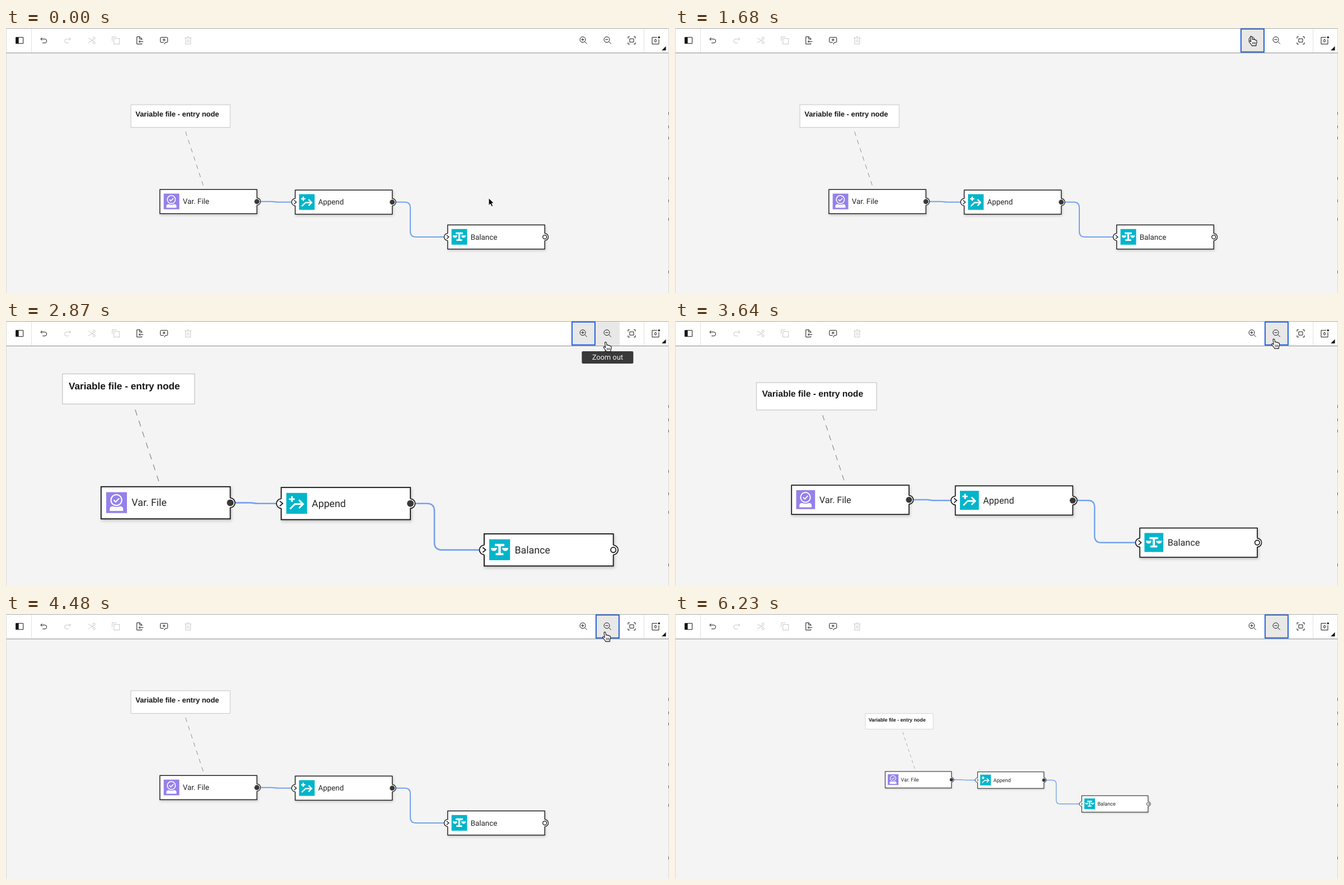
These frames come from a looping animation (1184 by 473 pixels, 6.86 s). An HTML page:

```html
<!DOCTYPE html>
<html lang="en">
<head>
<meta charset="utf-8">
<title>Flow canvas zoom</title>
<style>
html, body { margin: 0; width: 100%; height: 100%; overflow: hidden; background: #f4f4f4; }
svg { display: block; width: 1184px; height: 473px; }
text { font: 13.35px Roboto, sans-serif; fill: #262626; text-rendering: geometricPrecision; }
.note { font: bold 12.92px "Liberation Sans", Arial, sans-serif; fill: #161616; }
#tip text { font-size: 12.85px; fill: #f4f4f4; text-anchor: middle; }
.box { fill: #fff; stroke: #161616; stroke-width: 1.4; filter: drop-shadow(1px 2px 2px rgba(0,0,0,.2)); }
.line { fill: none; stroke: #161616; stroke-width: 1.3; }
.link { fill: none; stroke: #74a3ee; stroke-width: 2; }
.glyph { fill: none; stroke: #fff; stroke-width: 2.3; }
.thin { stroke-width: 1.6; }
.ico { fill: none; stroke: #161616; stroke-width: 2; }
.off { opacity: .24; }
.solid { fill: #161616; stroke: none; }
</style>
</head>
<body>
<svg viewBox="0 0 1184 473">
  <rect width="1184" height="473" fill="#f4f4f4"/>
  <g id="scene"></g>
  <rect width="1184" height="44" fill="#fff"/>
  <rect y="44" width="1184" height="1" fill="#8d8d8d"/>
  <rect id="hover" y=".7" width="43" height="43" fill="#e8e8e8"/>
  <rect id="focus" y="1.7" width="41" height="41" fill="#e8e8e8" stroke="#2160db" stroke-width="2"/>
  <path d="M45.5 1V44M1139.5 1V44" stroke="#e0e0e0"/>
  <g id="bar"></g>
  <path d="M1178.5 32.500v7.500h-7.500z" fill="#161616"/>
  <path d="M0 .5H1184" stroke="#a8a8a8"/>
  <path d="M.5 0V473M1183.500 0V473" stroke="#d8d8d8"/>
  <path id="edge" stroke="#555"/>
  <g id="tip">
    <path d="M-5.5 54L0 47.5L5.5 54z" fill="#393939"/>
    <rect y="54" height="22" rx="2" fill="#393939"/>
    <text y="69.3"></text>
  </g>
  <path id="arrow" d="M0 0V13.2L3 10.4L5.2 15.2L7.6 14.1L5.5 9.4H9.4Z" fill="#000" stroke="#fff" stroke-linejoin="round"/>
  <g id="hand" stroke="#111" stroke-width="1.1" stroke-linejoin="round" stroke-linecap="round">
    <path fill="#fff" d="M-1.5 2C-1.7 .2 1 .2 1.3 2L2.2 6.6C2.8 5.3 4.8 5.5 5 7.1C5.8 6 7.4 6.4 7.5 7.9C8.6 7.2 9.9 7.9 10 9.3C10.3 12 9.4 13.3 8.8 15V17.6H1.2C.6 15.5 -1.6 14 -3.4 11.2C-4.8 9.2 -3 8.2 -1.7 9.4L-.4 10.6Z"/>
    <path fill="none" d="M2.6 11.3V14.6M4.8 11.3V14.6M7 11.3V14.6" stroke-width=".9"/>
  </g>
</svg>
<script>
const $ = id => document.getElementById(id);
const LOOP = 6860, STEP = 70, CX = 592, CY = 265.6;
const NODE_W = 173.3, NODE_H = 43.1, PORT_R = 6.4, CELL = 43;

// Flow: comment, links and nodes
const glyphs = {
  file: `<circle class="glyph thin" cx="13.7" cy="10.6" r="7.2"/>
    <path class="glyph thin" d="M10.2 10.6l2.6 2.5 4.6-4.8"/>
    <path fill="#fff" d="M4.8 25.2v-2.6q0-3.6 4-3.6q5 1.8 10 0q4 0 4 3.6v2.6z"/>`,
  append: '<path class="glyph" d="M7.5 4.500v7.500M3.700 8.300h7.600M5 21.500l6.500-6.500H22M17 9.500l5.500 5.500-5.500 5.500"/>',
  scale: `<path fill="#fff" d="M7.500 6h12.700v3.200h-4.700v9.300h3.500v2.800H8.700v-2.800h3.500V9.200H7.500z
    M2 11.500h8.400a4.200 4.200 0 0 1-8.400 0zM17.300 11.500h8.400a4.200 4.200 0 0 1-8.400 0z"/>`
};

const port = (x, y, sweep) => `<circle cx="${x}" cy="${y}" r="${PORT_R}" fill="#fff"/>
  <path class="line" d="M${x} ${y - PORT_R}a${PORT_R} ${PORT_R} 0 0 ${sweep} 0 ${2 * PORT_R}"/>`;

function node(x, y, name, color, glyph, input, open) {
  const py = y + NODE_H / 2, rx = x + NODE_W;
  const dot = open ? 'class="line" r="3.500"' : 'fill="#393939" r="4.500"';
  return `<rect class="box" x="${x}" y="${y}" width="${NODE_W}" height="${NODE_H}"/>
    <g transform="translate(${x + 6.8} ${y + 7.3})">
      <rect width="27.9" height="28" fill="${color}"/>${glyphs[glyph]}</g>
    <text x="${x + 41}" y="${y + 26}">${name}</text>
    ${input ? port(x, py, 0) + `<path class="line" d="M${x - 2} ${py - 3.3}l4 3.3-4 3.3"/>` : ''}
    ${port(rx, py, 1)}<circle cx="${rx}" cy="${py}" ${dot}/>`;
}

$('scene').innerHTML = `
  <path d="M320.6 185L352.2 281" stroke="#8d8d8d" stroke-dasharray="8 7.5"/>
  <rect x="223" y="137" width="177.3" height="40.4" fill="#fff" stroke="#c6c6c6"/>
  <text class="note" x="231.3" y="157.5">Variable file - entry node</text>
  <path class="link" d="M454 309.800H474C480 309.800 480 310.800 486 310.800H511"/>
  <path class="link" d="M696 310.800H712q10 0 10 10V363q0 10 10 10H783"/>` +
  node(274.8, 288.3, 'Var. File', '#9681ea', 'file') +
  node(516.5, 289.3, 'Append', '#00b5cb', 'append', true) +
  node(788.8, 351.5, 'Balance', '#00b5cb', 'scale', true, true);

// Toolbar icons on a 32-unit grid, one per cell
const lens = '<circle cx="13" cy="13" r="10"/><path d="M20.5 20.5l7.8 7.8M8 13h10"/>';
const left = [
  '<path d="M3 5H29V27H3z"/><path class="solid" d="M3 5h10v22H3z"/>',
  '<path d="M11 5.7L5.4 11l5.6 5.3M6 11H20a7 7 0 0 1 0 14H12"/>',
  '<path class="off" d="M21 5.7L26.6 11 21 16.3M26 11H12a7 7 0 0 0 0 14h8"/>',
  '<g class="off"><circle cx="24" cy="8" r="4"/><circle cx="24" cy="24" r="4"/><path d="M3.5 7.5L22 18M3.5 24.5L22 14"/></g>',
  '<path class="off" d="M9 9H29V29H9zM3 18V3H18"/>',
  '<path d="M23 14V10L16 3H5V29H23V26M15 3v8h8M28 20H13M17 15.5L12.5 20l4.5 4.5"/>',
  '<path d="M17 29.5l3.7-6.5H26q3 0 3-3V8q0-3-3-3H6Q3 5 3 8v12q0 3 3 3h9M16 9v10M11 14h10"/>',
  '<path class="off" d="M4 7H28M7 7V29H25V7M13 12V24M19 12V24M12 3h8"/>'
];
const right = [
  lens + '<path d="M13 8v10"/>',
  lens,
  '<path d="M3 9V3H9M23 3h6v6M29 23v6h-6M9 29H3v-6M9 10H23V22H9z"/>',
  '<path d="M21 5H3V29H27V12"/><ellipse cx="15" cy="17" rx="3" ry="5"/><circle class="solid" cx="27.5" cy="5" r="3.5"/>'
];
const row = (list, x) => list.map((art, i) =>
  `<g class="ico" transform="translate(${x + i * CELL} 14.2) scale(.5)">${art}</g>`).join('');
$('bar').innerHTML = row(left, 16.2) + row(right, 1023.4);

// Clipped bits of the neighbouring panel
$('edge').setAttribute('d', [152, 176, 196, 268, 308, 341, 435].map(y => `M1183.5 ${y - 2}v5`).join(''));

// Buttons: when each takes focus and when its tooltip may appear
const buttons = [
  { x: 1009.8, label: 'Zoom in', focus: 1330, tip: 910 },
  { x: 1052.8, label: 'Zoom out', focus: 3500, tip: 2800 },
  { x: 1095.8, focus: 70 }
];
const zoomIn = [1820, 1960, 2100];
const zoomOut = [3570, 3920, 4270, 4550, 4900, 5180, 5670];
// Pointer moves: start, end, x, y
const moves = [
  [70, 350, 905, 262], [490, 910, 1025, 28.5], [1260, 1540, 1029, 14],
  [2170, 2800, 1071, 37], [3290, 3360, 1069.5, 31.5], [5740, 6300, 1040, 490]
];

const past = (times, t) => times.filter(k => k <= t).length;
const show = (el, on) => el.setAttribute('visibility', on ? 'visible' : 'hidden');
const easeOut = f => 1 - (1 - f) ** 2;

function pointer(t) {
  let x = 862, y = 303.5;
  for (const [from, to, mx, my] of moves) {
    const f = easeOut(Math.min(1, Math.max(0, (t - from) / (to - from))));
    x += (mx - x) * f;
    y += (my - y) * f;
  }
  return [x, y];
}

function drawTip(button, t) {
  const on = button && button.label && t >= button.tip && t < button.focus;
  show($('tip'), on);
  if (!on) return;
  const box = $('tip').querySelector('rect'), w = 24 + 8.5 * button.label.length;
  $('tip').setAttribute('transform', `translate(${button.x + CELL / 2} 0)`);
  box.setAttribute('x', -w / 2);
  box.setAttribute('width', w);
  $('tip').querySelector('text').textContent = button.label;
}

function draw(now) {
  const t = Math.floor(now % LOOP / STEP) * STEP;
  const k = 1.1 ** (past(zoomIn, t) - past(zoomOut, t));
  $('scene').setAttribute('transform', `translate(${CX} ${CY}) scale(${k}) translate(${-CX} ${-CY})`);

  const [x, y] = pointer(t);
  const hovered = buttons.find(b => y < 45 && x >= b.x && x < b.x + CELL);
  const focused = buttons.filter(b => b.focus <= t).sort((a, b) => b.focus - a.focus)[0];
  show($('hover'), hovered);
  show($('focus'), focused);
  if (hovered) $('hover').setAttribute('x', hovered.x);
  if (focused) $('focus').setAttribute('x', focused.x + 1);
  drawTip(hovered, t);

  for (const id of ['arrow', 'hand']) $(id).setAttribute('transform', `translate(${x} ${y})`);
  show($('hand'), hovered);
  show($('arrow'), !hovered);
}

const start = performance.now();
(function tick() {
  draw(performance.now() - start);
  requestAnimationFrame(tick);
})();
</script>
</body>
</html>
```
